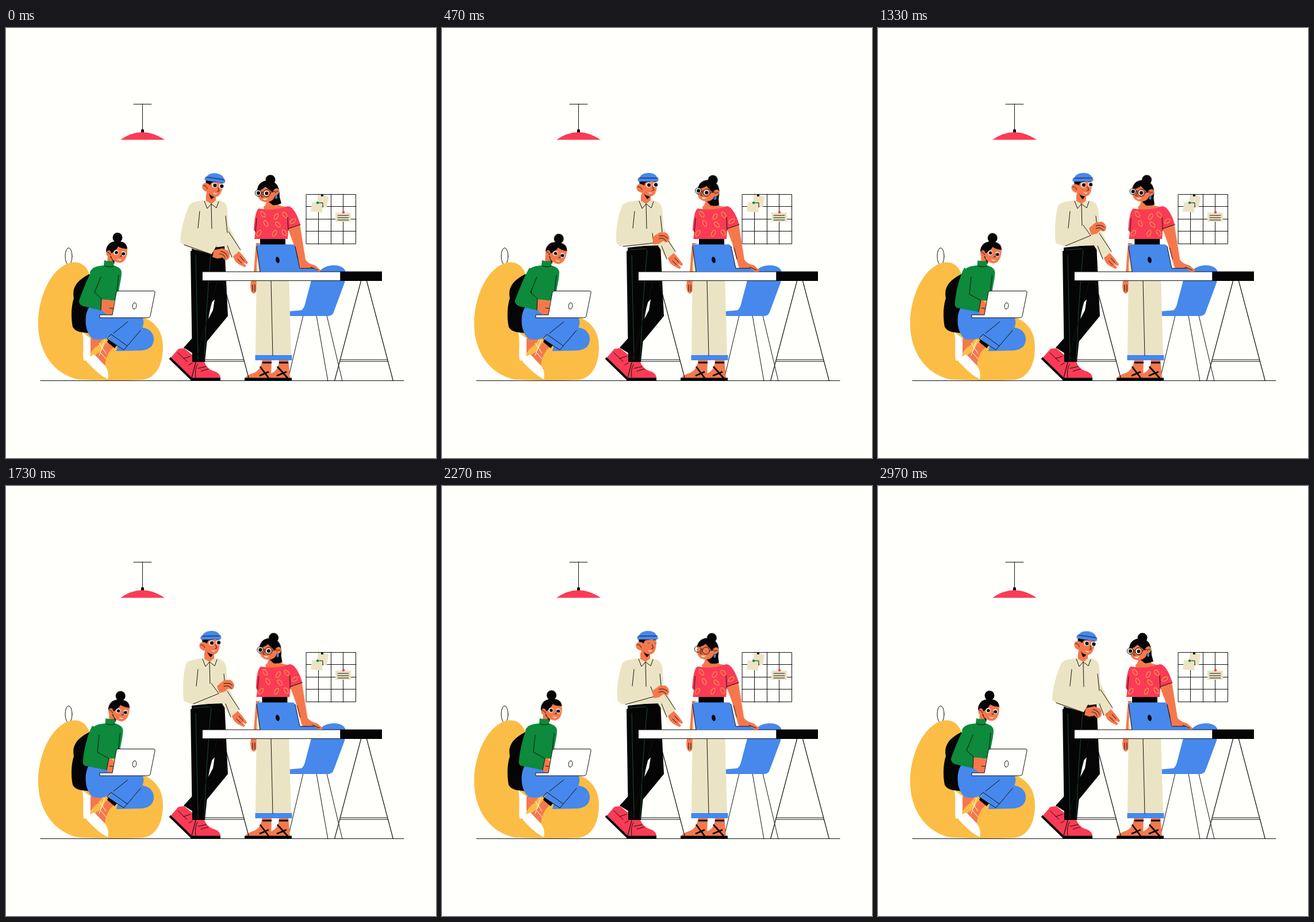
An HTML page without scripts that plays this animation: 748 by 748 pixels, repeating every 3000 ms.

```html
<!DOCTYPE html>
<html lang="en">
<head>
<meta charset="utf-8">
<title>Team at work</title>
<style>
html, body { margin: 0; width: 100%; height: 100%; overflow: hidden; background: #fffffb; }
svg { display: block; width: 100vw; height: 100vh; }

.ink { fill: none; stroke: #111; stroke-width: 1; stroke-linecap: round; stroke-linejoin: round; }
.leg { fill: none; stroke: #111; stroke-width: 1.2; }
.sole { fill: none; stroke: #050505; stroke-width: 4; }
.strap { fill: none; stroke: #050505; stroke-width: 2.8; }
.seam { fill: none; stroke: #1c4c36; stroke-width: 1; }
.outlined { stroke: #111; stroke-width: 1; stroke-linejoin: round; }
.black { fill: #050505; }
.white { fill: #fffffd; }
.skin { fill: #f5784c; }
.red { fill: #fb3b55; }
.blue { fill: #4688ec; }
.green { fill: #0d8a3b; }
.cream { fill: #ebe4c4; }
.yellow { fill: #fcbd46; }
.leaf { fill: none; stroke: #fcb548; stroke-width: 1.1; }

.move { animation: 3s ease-in-out infinite; }

.g-body { animation-name: g-body; }
@keyframes g-body {
  0%, 99%, 100% { transform: none; }
  15.7% { transform: translateX(3px); }
  27.7%, 57.7% { transform: translateX(2.5px); }
  75.7% { transform: translateX(-1px); }
}
.g-head { transform-origin: 183px 410px; animation-name: g-head; }
@keyframes g-head {
  0%, 99%, 100% { transform: none; }
  15.7% { transform: rotate(8deg); }
  27.7%, 57.7% { transform: rotate(3.5deg); }
  75.7% { transform: rotate(-3deg); }
}
.g-sleeve { animation-name: g-sleeve; }
@keyframes g-sleeve {
  0%, 15.7%, 27.7%, 99%, 100% { d: path("M152 417C142 434 133 458 127 474C126 480 132 484 139 485L165 491L166 471L154 459L168 425Z"); }
  44.3%, 57.7%, 75.7% { d: path("M150 417C141 434 136 458 134 476C133 483 135 487 139 487L175 494L179 474L160 464L165 425Z"); }
}
.g-fold { animation-name: g-fold; }
@keyframes g-fold {
  0%, 15.7%, 27.7%, 99%, 100% { d: path("M165 433L154 460L166 471L165 491"); }
  44.3%, 57.7%, 75.7% { d: path("M162 433L159 463L179 474L175 494"); }
}
.g-hand { animation-name: g-hand; }
@keyframes g-hand {
  0%, 15.7%, 27.7%, 99%, 100% { d: path("M166 472L180 473L188 475L187 498L176 499L165 490Z"); }
  44.3%, 57.7%, 75.7% { d: path("M178 475L182 473L188 480L187 498L179 498L174 494Z"); }
}

.m-head { transform-origin: 356px 300px; animation-name: m-head; }
@keyframes m-head {
  0%, 99%, 100% { transform: translateX(1px) rotate(8.5deg); }
  15.7% { transform: translateX(1.5px); }
  27.7%, 57.7% { transform: rotate(-1deg); }
  75.7% { transform: translateX(.5px); }
}
.m-shirt { animation-name: m-shirt; }
@keyframes m-shirt {
  0%, 99%, 100% { d: path("M341 300L371 300C380 302 384 306 385 314L387 345L385 379L330 386L303 372C304 350 311 325 319 308C324 302 332 302 341 300Z"); }
  15.7% { d: path("M340 300L368 300C377 302 381 306 383 314L385 340L383 378L326 380L303 373C302 350 306 325 314 308C319 302 329 302 340 300Z"); }
  27.7%, 57.7% { d: path("M338 300L367 300C376 302 381 306 383 314L385 340L382 378L326 380L309 374C307 350 308 325 314 308C319 302 329 302 338 300Z"); }
  75.7% { d: path("M338 300L367 300C376 302 381 306 383 314L385 340L382 378L326 380L305 373C304 350 307 325 314 308C319 302 329 302 338 300Z"); }
}
.m-collar { animation-name: m-collar; }
@keyframes m-collar {
  0%, 99%, 100% { transform: translateX(3px); }
  15.7% { transform: translateX(1px); }
  27.7%, 75.7% { transform: none; }
}
.m-sleeve { animation-name: m-sleeve; }
@keyframes m-sleeve {
  0%, 99%, 100% { d: path("M303 372L330 350L366 380L358 394L312 380Z"); }
  15.7% { d: path("M303 372L330 350L366 357L368 374L309 380Z"); }
  27.7%, 57.7% { d: path("M309 374L330 352L357 343L370 361L324 380Z"); }
  75.7% { d: path("M306 374L330 350L363 349L370 366L314 380Z"); }
}
.m-fold { animation-name: m-fold; }
@keyframes m-fold {
  0%, 99%, 100% { d: path("M310 377L358 394L366 380"); }
  15.7% { d: path("M315 380L368 374L366 357"); }
  27.7%, 57.7% { d: path("M326 379L370 361L357 343"); }
  75.7% { d: path("M319 380L370 366L363 349"); }
}
.m-hand { transform-origin: 368px 353px; animation-name: m-hand; }
@keyframes m-hand {
  0%, 99%, 100% { transform: translate(-8px, 38px) rotate(29deg); }
  15.7% { transform: translate(-2px, 16px) rotate(7deg); }
  27.7%, 57.7% { transform: none; }
  75.7% { transform: translate(-2px, 9px) rotate(3deg); }
}
.m-arm { animation-name: m-arm; }
@keyframes m-arm {
  0%, 99%, 100% { transform: translate(2px, -3px); }
  15.7%, 75.7% { transform: none; }
}

.w-body { animation-name: w-body; }
@keyframes w-body {
  0%, 99%, 100% { transform: none; }
  15.7%, 27.7% { transform: translateX(5px); }
  44.3%, 75.7% { transform: translateX(4.3px); }
  57.7% { transform: translateX(3.5px); }
}
.w-head { transform-origin: 462px 312px; animation-name: w-head; }
@keyframes w-head {
  0%, 99%, 100% { transform: none; }
  15.7%, 27.7% { transform: translateX(-3px) rotate(11deg); }
  44.3% { transform: translateX(-3px) rotate(7.5deg); }
  57.7% { transform: translateX(-2.5px) rotate(5.5deg); }
  75.7% { transform: translateX(-2.5px) rotate(9deg); }
}
.eyes { transform-box: fill-box; transform-origin: 50% 60%; animation-name: blink; }
@keyframes blink {
  0%, 72.8%, 78.6%, 100% { transform: none; }
  74.8%, 76.6% { transform: scaleY(.1); }
}
</style>
</head>
<body>
<svg viewBox="0 0 748 748">
  <defs>
    <ellipse id="leaf" class="leaf" rx="3" ry="5.5"/>
    <path id="trestle" class="leg" d="M-5 440L-51 614M5 440L51 614M-41 577H41M-42 580H42"/>
    <g id="eye">
      <circle class="white" r="4.6"/>
      <circle class="black" cx=".5" cy=".2" r="3.1"/>
    </g>
  </defs>

  <path class="ink" d="M60 613.5H692"/>

  <!-- lamp -->
  <path class="ink" d="M222 132.5H253M237.5 132V178"/>
  <rect class="black" x="235" y="176" width="5" height="7" rx="2"/>
  <path class="red" d="M199 194.5Q237 168 276 194.5Z"/>

  <!-- wall grid -->
  <path class="ink" d="M522.5 289.5H608.5V375.5H522.5ZM543.5 289V376M565.5 289V376M586.5 289V376M522 310.500H609M522 332.500H609M522 353.500H609"/>
  <path class="cream" d="M543 290L561 293L558 312L540 308Z"/>
  <path class="cream" d="M532 303L551 305L550 321L530 319Z"/>
  <path class="cream" d="M573 321H600V337H573Z"/>
  <path class="ink" d="M542 304H551V312M577 326H596M577 330H596M577 334H596"/>
  <circle class="black" cx="550" cy="291" r="2.2"/>
  <circle class="green" cx="542" cy="304" r="2.2"/>
  <circle class="red" cx="587" cy="320.5" r="2.2"/>

  <!-- bean bag -->
  <ellipse class="ink" cx="109" cy="397" rx="6" ry="14.5"/>
  <path class="yellow" d="M120 407.5C85 408 56 460 56 515C56 562 82 602 126 611.5Q180 614 238 612C262 608 273 585 273 555C273 530 262 512 238 503L200 480L146 430C141 415 132 408 120 407.5Z"/>
  <path class="black" d="M145 428C124 439 114 451 118 470C113 485 113 505 116 520C122 530 132 529 145 531L172 470Z"/>

  <!-- seated woman -->
  <path class="white" d="M133 529L147 540L148 560C147 574 141 581 135 578C133 565 136 548 133 529Z"/>
  <path class="skin" d="M147 540L168 541L153 566L147 573Z"/>
  <path class="skin" d="M181 543L190 553C178 562 173 574 172 588L153 571C157 562 169 553 181 543Z"/>
  <path class="yellow" d="M147 566C157 549 168 550 173 546C171 558 162 568 147 571Z"/>
  <path class="white" d="M141 573L154 568L171 586C178 594 179 604 177 611C164 605 149 590 140 580Z"/>
  <path d="M162 548L174 566M172 543L162 570M165 565L174 576" fill="none" stroke="#fff"/>
  <path class="blue" d="M225 522C247 517 257 530 257 541C257 555 247 560 234 561L192 562L195 549Z"/>
  <path class="black" d="M179 540L193 552L189 557L176 546Z"/>
  <path class="blue" d="M145 485C136 497 135 528 151 541C164 544 174 541 184 536L177 541L205 560L232 529C240 520 241 510 237 502L187 497Z"/>
  <path class="ink" d="M176 541L205 560L211 553L183 533ZM187 531L212 511M211 553L234 526"/>

  <g class="move g-body">
    <path class="skin" d="M177 395H190L189 410H176Z"/>
    <path class="green" d="M171 404Q180 407 189 404L187 413C195 415 201 419 201 425C201 440 195 452 195 474H154L153 459L146 425C150 414 163 414 170 413Z"/>
    <path class="ink" d="M172 414Q180 417 187 414M196 430L193 458"/>
    <g class="move g-head">
      <circle class="black" cx="194" cy="364.5" r="8.5"/>
      <path class="black" d="M174 389C174 375 185 369 197 371C206 372 211 376 211 385L191 392L188 409L181 397Z"/>
      <path class="skin" d="M183 392C187 390 192 386 195 380C200 383 206 384 210.5 384C212 393 209 407 199 408.500C190 408 184 404 183 397C176 400 172 393 176 388C179 385 183 388 183 392Z"/>
      <path class="ink" d="M176 390Q180 390 182 395"/>
      <use href="#eye" transform="translate(191.500 390.500) scale(.9)"/>
      <use href="#eye" transform="translate(204 392.500) scale(.9)"/>
      <path class="ink" d="M201 391L201 397L198 397"/>
      <path class="white" d="M193 401Q198 404 202 402Q198 407 193 401Z"/>
    </g>
  </g>
  <path class="skin move g-hand"/>
  <path class="green move g-sleeve"/>
  <path class="ink move g-fold"/>
  <path class="ink" d="M180 487L187 488"/>
  <path class="white outlined" d="M195 457.5H257Q260 458 259 461L251 501Q250 504 247 504H163V499H185L192 460Q193 458 195 457.5Z"/>
  <ellipse class="ink" cx="223.5" cy="483.5" rx="3.3" ry="5.5" transform="rotate(8 223.5 483.5)"/>

  <!-- chair -->
  <path class="ink" d="M517 500L490 614M540 500L560 614M558 500L585 614"/>
  <path class="blue" d="M545 424C556 409 588 409 591 425L589 443L570 494Q568 501 560 501H491V493L514 491Q519 487 521 477L531 439Z"/>

  <!-- man, lower half -->
  <path class="red" d="M287 573L300 558L310 557L327 571L323 609Z"/>
  <path class="sole" d="M285 574L323 611"/>
  <path class="black" d="M323 382L380 376L383 440L386 501L330 569L309 556L347 514L349 486L324 450Z"/>
  <path class="black" d="M321 388L380 379C372 410 363 450 355 490L346 581H324Z"/>
  <path class="white" d="M357 478L363 472L360 491L352 506Z"/>
  <path class="seam" d="M330 395L334 576M357 386L354 420L349 490L345 578M327 386L356 384"/>
  <path class="red" d="M324 581H345C349 590 354 595 365 598Q373 602 373 609H322Z"/>
  <path class="black" d="M321 608.5H373V613.5H321Z"/>
  <path class="ink" d="M299 565L315 580M309 575L321 571M318 586L324 583M334 592L348 589M339 597L352 593M330 608Q328 594 333 585"/>

  <!-- woman, lower half -->
  <path class="skin" d="M435 374H443L437 440C438 452 436 461 431 462C426 461 424 452 426 441L431 425Z"/>
  <path class="ink" d="M429 447V458M433 447V458"/>
  <path class="skin" d="M446 575H462L461 609H417Q418 604 431 600Q444 595 446 575ZM475 575H491L494 609H450Q452 603 463 600Q475 594 475 575Z"/>
  <path class="strap" d="M446 582H462M475 582H491M442 589L457 609M457 598L441 605M472 589L490 609M488 598L471 605"/>
  <path class="black" d="M415 608.5H497V613.5H415Z"/>
  <path class="cream" d="M440 375H488L492 430L496 570H434L436 410Z"/>
  <path class="blue" d="M433.5 569H497.5V578H433.5Z"/>
  <path class="ink" d="M461 439L464 570"/>

  <!-- table -->
  <use href="#trestle" x="372.5"/>
  <use href="#trestle" x="622.5"/>
  <path class="white outlined" d="M341.5 424H582V439.5H341.5Z"/>
  <path class="black" d="M581.5 423.5H654V440H581.5Z"/>

  <!-- man, upper half -->
  <g class="move m-arm">
    <path class="skin" d="M391 397L403 391L411 400L419 411L417 414L410 410L416 417L413 419L403 414L397 409Z"/>
    <path class="ink" d="M405 400L412 408M401 405L408 412"/>
    <path class="cream" d="M382 340L406 389L391 402L376 379Z"/>
    <path class="ink" d="M385 357L406 389M382 379L391 402"/>
  </g>
  <path class="cream move m-shirt"/>
  <g class="move m-collar">
    <path class="skin" d="M345 290H362V300L354 307L345 301Z"/>
    <path class="cream" d="M344 300L354 306L347 314L338 303ZM362 300L354 306L363 313L368 303Z"/>
    <path class="ink" d="M342 301L347 314L354 306L363 313L367 302M354 306L355 349M334 319L331 348M379 327L382 356"/>
  </g>
  <path class="cream move m-sleeve"/>
  <path class="ink move m-fold"/>
  <g class="move m-hand">
    <path class="skin" d="M367 348L379 338L389 337C393 338 397 343 397 348L395 353L391 354L387 352L380 358L371 360Z"/>
    <path class="ink" d="M379 344Q388 341 394 347M379 349Q387 345 392 352"/>
  </g>
  <g class="move m-head">
    <path class="black" d="M341 264H372L369 272L352 280L344 281Z"/>
    <path class="skin" d="M346 282H361V299H346Z"/>
    <path class="black" d="M350 287L362 291L356 298Q352 294 350 287Z"/>
    <path class="skin" d="M350 274Q352 268 355 267H372C373 282 370 293 361 293C355 293 351 290 349 286C338 288 333 276 340 272Q346 270 350 274Z"/>
    <path class="ink" d="M339 276Q345 276 346 281M365 276L367 282L364 283M353 268L361 267M367 268L372 267"/>
    <g class="move eyes">
      <use href="#eye" x="358" y="273"/>
      <use href="#eye" x="370" y="272.5"/>
    </g>
    <path class="white" d="M357 285Q361 288 365 286Q361 291 357 285Z"/>
    <path class="blue" d="M342 262C342 256 350 252 358 252C366 252 373 256 373 262Z"/>
    <rect class="blue" x="339" y="261" width="36" height="6" rx="2.5"/>
    <path class="ink" d="M341 261H374"/>
  </g>

  <!-- woman, upper half -->
  <g class="move w-body">
    <path class="black" d="M442 364H486V378H442Z"/>
    <path class="skin" d="M448 311Q453 309 454 296H468Q468 309 486 311L484 318H449Z"/>
    <path class="skin" d="M489 345L511 340L521 403Q525 410 538 413L548 422L545 424H520Q511 420 509 408L500 375Z"/>
    <path class="red" d="M440 314Q465 319 490 310C500 310 508 328 512 342L491 350L490 367H432L434 354L431 352C432 336 434 317 440 314Z"/>
    <path class="ink" d="M490 329L491 352M491 349L512 342M436 331L434 355M503 382L508 402M530 416L542 421"/>
    <use href="#leaf" transform="translate(447 324) rotate(-35)"/>
    <use href="#leaf" transform="translate(470 328) rotate(30)"/>
    <use href="#leaf" transform="translate(485 325) rotate(-35)"/>
    <use href="#leaf" transform="translate(452 340) rotate(-25)"/>
    <use href="#leaf" transform="translate(473 342) rotate(-40)"/>
    <use href="#leaf" transform="translate(499 336) rotate(55)"/>
    <use href="#leaf" transform="translate(440 357) rotate(35)"/>
    <use href="#leaf" transform="translate(467 357) rotate(25)"/>
    <use href="#leaf" transform="translate(484 356) rotate(-30)"/>
    <g class="move w-head">
      <circle class="black" cx="460" cy="264" r="8.5"/>
      <path class="black" d="M437 284C437 269 449 263 461 266C474 269 476 282 476 294L479 305Q472 309 464 308L455 301Z"/>
      <path class="skin" d="M438 283Q446 282 451 276Q457 281 464 286C466 277 475 277 475 284C475 289 471 292 468 291C467 299 460 303 452 303C441 302 437 294 438 283Z"/>
      <path class="ink" d="M468 287Q470 283 473 284M447 288L444 294L448 294"/>
      <g class="move eyes">
        <use href="#eye" x="438.500" y="287"/>
        <use href="#eye" x="453" y="287.500"/>
      </g>
      <circle class="ink" cx="439" cy="287" r="5.6"/>
      <circle class="ink" cx="453.5" cy="287.5" r="6.2"/>
      <path class="ink" d="M445 286H447M460 286L468 284"/>
      <path class="white" d="M446 297Q450 298 455 296Q451 302 446 297Z"/>
      <ellipse class="blue" cx="470" cy="294" rx="1.8" ry="3.2"/>
    </g>
  </g>
  <path class="blue" d="M439 376.5H499Q502 377 503 380L511 418H536L545 424H442L436 380Q436 377 439 376.5Z"/>
  <path class="ink" d="M436 380L442 424M503 380L511 418H536"/>
  <ellipse class="black" cx="472.5" cy="403.5" rx="3.3" ry="5.5" transform="rotate(-12 472.5 403.5)"/>
</svg>
</body>
</html>
```
